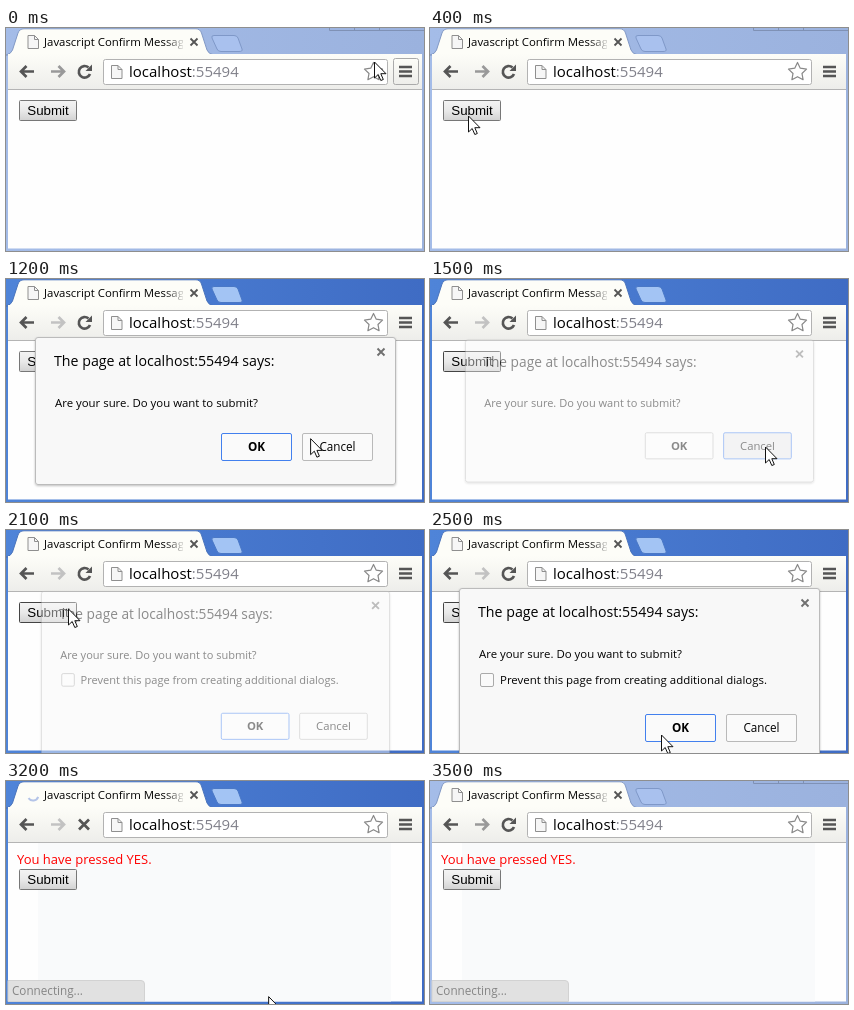
Animation, 418 px wide and 223 px high, one loop 3600 ms. Source, as an HTML page:

```html
<!DOCTYPE html>
<html lang="en">
<head>
<meta charset="utf-8">
<title>Confirm dialog</title>
<style>
html, body { margin: 0; height: 100%; overflow: hidden; }
svg { display: block; width: 100vw; height: 100vh; }
text { font-family: "Open Sans", "Noto Sans", sans-serif; white-space: pre; }
.arial { font-family: "Liberation Sans", Arial, sans-serif; }
.icon { fill: none; stroke: #555; stroke-width: 2.7; }
</style>
</head>
<body>
<svg viewBox="0 0 418 223">
  <defs>
    <linearGradient id="sky"><stop id="skyLeft"/><stop id="skyRight" offset="1"/></linearGradient>
    <linearGradient id="bar" x2="0" y2="1"><stop stop-color="#fdfdf8"/><stop offset="1" stop-color="#ededea"/></linearGradient>
    <linearGradient id="btn" x2="0" y2="1"><stop stop-color="#f4f4f4"/><stop offset=".5" stop-color="#e9e9e9"/><stop offset="1" stop-color="#d2d2d2"/></linearGradient>
    <linearGradient id="title" gradientUnits="userSpaceOnUse" x1="38" x2="178"><stop offset=".86"/><stop offset="1" stop-opacity=".1"/></linearGradient>
    <filter id="shadow" x="-10%" y="-10%" width="120%" height="125%"><feDropShadow dx="0" dy="1" stdDeviation="1.2" flood-opacity=".25"/></filter>
    <clipPath id="tabClip"><path d="M36 0H177V26H36Z"/></clipPath>
    <g id="sheet" fill="#f6f6f6" stroke="#8f8f8f"><path d="M.5 .5H7L11 4.5V13.5H.5Z"/><path d="M7 .5V4.5H11" fill="none"/></g>
  </defs>

  <rect width="418" height="223" fill="url(#sky)"/>
  <path id="controls" d="M323.5 0V2.5H418M348.5 0V2.5M373.5 0V2.5" fill="none" stroke="#7f91b5"/>
  <path id="newTab" d="M208 7.5H228Q231 7.5 232 10L236 21Q237 23.5 233 23.5H215Q212 23.5 211 21L206 10Q205 7.5 208 7.5Z"/>
  <path id="tab" d="M0 27Q5 26 6.5 22L12 5Q13.5 .8 18 .8H190Q194 .8 195.5 5L201 22Q202.5 26 208 27Z" fill="#fdfdf8"/>
  <rect x="2" y="26" width="414" height="36" fill="url(#bar)"/>
  <path d="M2 61.5H416" stroke="#b4b4b4"/>
  <use id="tabIcon" href="#sheet" x="21.5" y="7"/>
  <path id="spinner" d="M-1 -5.4A5.5 5.5 0 0 1 5 2.3" fill="none" stroke="#b4c4e8" stroke-width="2"/>
  <text x="38" y="18" font-size="11.4" fill="url(#title)" clip-path="url(#tabClip)">Javascript Confirm Message</text>
  <path d="M184.5 10.5L191.5 17.5M191.5 10.5L184.5 17.5" stroke="#555" stroke-width="1.8"/>

  <path class="icon" d="M28 43.5H15M20.5 38L15 43.5L20.5 49"/>
  <path id="forward" class="icon" d="M45 43.5H58M52.5 38L58 43.5L52.5 49"/>
  <g id="reload"><path class="icon" d="M82.5 39.5A5.8 5.8 0 1 0 84 46"/><path d="M86 36.5V43H79.5Z" fill="#555"/></g>
  <path id="stop" class="icon" d="M73 38.5L83 48.5M83 38.5L73 48.5"/>
  <rect x="97.5" y="31.5" width="284" height="25" rx="2" fill="#fff" stroke="#b2b2b2"/>
  <use href="#sheet" x="105" y="37"/>
  <text x="123" y="49" font-size="15">localhost<tspan fill="#80808a">:55494</tspan></text>
  <path id="star" fill="#fff" stroke="#888" stroke-width="1.2" stroke-linejoin="round"/>
  <rect id="hover" x="387.5" y="30.5" width="25" height="26" rx="2" fill="url(#bar)" stroke="#aaa"/>
  <path d="M393 39H406M393 43.5H406M393 48H406" stroke="#555" stroke-width="2.6"/>

  <rect x="2" y="62" width="414" height="158.5" fill="#fefefe"/>
  <rect id="ghost" x="32" y="62" width="353" height="158.5" fill="#f9fafb"/>
  <text id="answer" x="11" y="83" font-size="13" fill="#f00">You have pressed YES.</text>
  <g id="submit">
    <rect id="submitBox" x="13.5" y="72.5" width="57" height="20" rx="1" fill="url(#btn)"/>
    <text class="arial" x="42" y="87" font-size="13.33" text-anchor="middle">Submit</text>
  </g>
  <g id="status">
    <path d="M2 220.5V199.5H135Q138.5 199.5 138.5 203V220.5Z" fill="#e1e1e1" stroke="#d2d2d2"/>
    <text x="6" y="214" font-size="11.7" fill="#858585">Connecting...</text>
  </g>

  <g id="dialog">
    <rect id="panel" x="29.5" y="58.5" width="360" fill="#f8f8f8" stroke="#bbb" rx="2.5" filter="url(#shadow)"/>
    <path d="M371.5 69.5L378.5 76.5M378.5 69.5L371.5 76.5" stroke="#707070" stroke-width="1.9"/>
    <text x="48" y="87" font-size="14.2">The page at localhost:55494 says:</text>
    <text x="49" y="128" font-size="11.4">Are your sure. Do you want to submit?</text>
    <g id="prevent">
      <rect x="50.5" y="143.5" width="13" height="13" rx="1.5" fill="#fafafa" stroke="#aaa"/>
      <text x="70" y="154" font-size="11.45">Prevent this page from creating additional dialogs.</text>
    </g>
    <g id="buttons" font-size="11.7" text-anchor="middle">
      <rect id="okBox" x="215.5" y="154.5" width="70" height="27" rx="1.5"/>
      <text x="250.5" y="172" font-weight="700">OK</text>
      <rect id="cancelBox" x="296.5" y="154.5" width="70" height="27" rx="1.5"/>
      <text x="331.5" y="172">Cancel</text>
    </g>
  </g>
  <path id="cursor" d="M.5 0V16L4.2 12.5L6.8 18.5L9.3 17.5L6.8 11.7H12Z" fill="#fff" stroke="#111"/>
</svg>
<script>
const LOOP = 3600, STEP = 100;
const $ = id => document.getElementById(id);
const set = (id, attrs) => { for (const k in attrs) $(id).setAttribute(k, attrs[k]); };
const show = (id, on) => set(id, { visibility: on ? "visible" : "hidden" });

// time, x, y of the pointer tip
const path = [
  [0, 368, 34], [400, 38, 88], [800, 38, 88], [1300, 335, 168], [1500, 335, 168],
  [2000, 62, 79], [2300, 62, 79], [2500, 231, 205], [2700, 254, 186],
  [3000, 254, 186], [3300, 265, 226], [LOOP, 265, 226]
];

function pointer(t) {
  const i = path.findIndex(p => p[0] > t);
  const [t0, x0, y0] = path[i - 1], [t1, x1, y1] = path[i];
  const u = (t - t0) / (t1 - t0), e = u * u * (3 - 2 * u);
  return [x0 + (x1 - x0) * e, y0 + (y1 - y0) * e];
}

function dialogAlpha(t) {
  if (t < 600 || t >= 3100 || (t >= 1600 && t < 2100)) return 0;
  if (t === 1500 || t === 2100 || t === 3000) return 0.45;
  return { 600: 0.3, 700: 0.7, 2200: 0.8 }[t] || 1;
}

function drawButton(id, focused, pressed) {
  set(id + "Box", {
    fill: pressed ? "#e6e7ea" : "#fafafa",
    stroke: focused ? "#4280ee" : "#b9b9b9"
  });
}

function drawDialog(t) {
  const alpha = dialogAlpha(t), again = t >= 2100;
  const cy = again ? 147 : 132, scale = 0.94 + 0.06 * alpha;
  const onCancel = t >= 1400 && t < 1600, onOk = t >= 2800;
  show("dialog", alpha > 0);
  set("dialog", {
    opacity: alpha,
    transform: `translate(209.5 ${cy}) scale(${scale}) translate(-209.5 ${-cy})`
  });
  set("panel", { height: again ? 177 : 147 });
  set("prevent", { display: again ? "inline" : "none" });
  set("buttons", { transform: `translate(0 ${again ? 30 : 0})` });
  drawButton("ok", !onCancel && !onOk, onOk);
  drawButton("cancel", onCancel, onCancel);
}

function draw(t) {
  const active = t >= 600 && t < 3500;
  const loading = t >= 2900 && t < 3300;
  const done = t >= 3200;
  set("skyLeft", { "stop-color": active ? "#4f84d8" : "#a4bce8" });
  set("skyRight", { "stop-color": active ? "#3f6cc4" : "#9bb2de" });
  show("controls", !active);
  set("newTab", {
    fill: active ? "#a3c4f4" : "#a9c1ee",
    stroke: active ? "#4a78c6" : "#7f98c8"
  });
  set("tab", { stroke: active ? "#4a74bc" : "#8299c5" });
  set("forward", { style: `stroke:${active ? "#c2c2c2" : "#999"}` });
  show("tabIcon", !loading);
  show("reload", !loading);
  show("spinner", loading);
  show("stop", loading);
  set("spinner", { transform: `translate(27 14) rotate(${(t - 3000) * 0.6})` });
  show("hover", t < 100);
  show("ghost", t >= 3100);
  show("status", t >= 3100);
  show("answer", done);
  set("submit", { transform: `translate(0 ${done ? 16 : 0})` });
  set("submitBox", { stroke: t >= 1500 && !done ? "#444" : "#777" });
  drawDialog(t);
  set("cursor", { transform: `translate(${pointer(t)})` });
  show("cursor", t < 3300);
}

const star = Array.from({ length: 10 }, (_, i) => {
  const r = i % 2 ? 4.7 : 9.5, a = i * Math.PI / 5;
  return [367.5 + r * Math.sin(a), 44 - r * Math.cos(a)];
});
set("star", { d: "M" + star.join("L") + "Z" });

const start = performance.now();
function tick(now) {
  const t = Math.max(0, now - start) % LOOP;
  draw(Math.floor(t / STEP) * STEP);
  requestAnimationFrame(tick);
}
draw(0);
requestAnimationFrame(tick);
</script>
</body>
</html>
```
